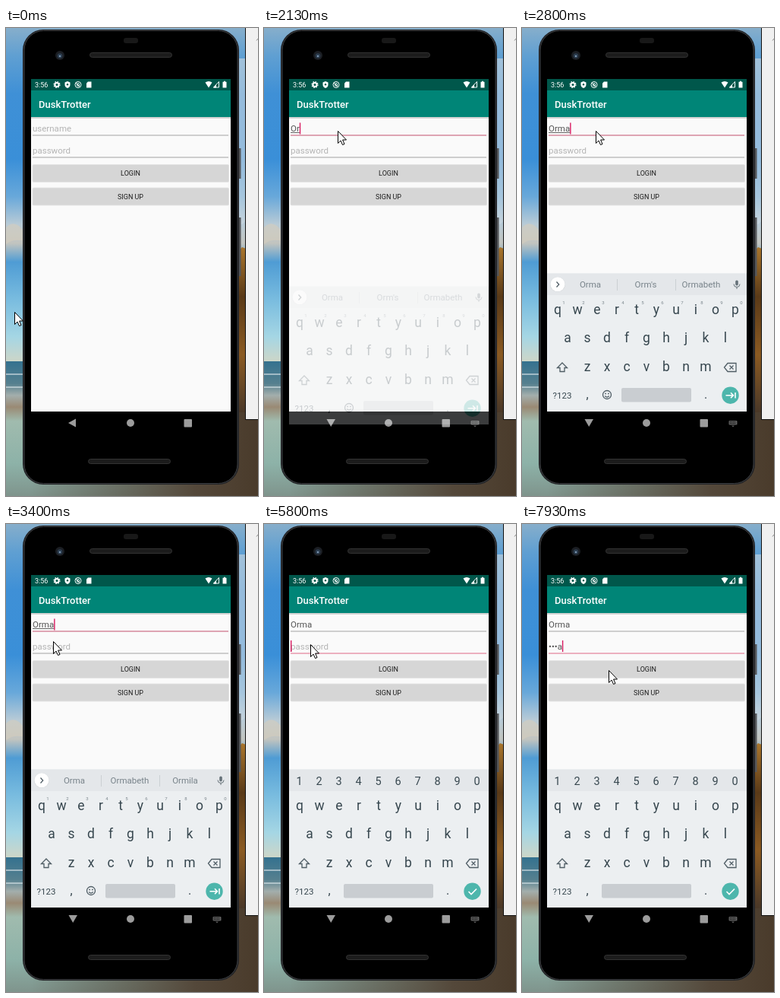
An HTML page for the animation above (8 s loop, 332 by 615 pixels).

```html
<!DOCTYPE html>
<html lang="en">
<head>
<meta charset="utf-8">
<title>Login screen demo</title>
<style>
html, body { margin: 0; width: 100%; height: 100%; overflow: hidden; background: #000; }
svg { display: block; width: 332px; height: 615px; font-family: Roboto, sans-serif; }
.field { font-size: 11.5px; fill: #555; }
.hint { fill: #b4b4b4; }
.mid { text-anchor: middle; }
.button { font-size: 9px; fill: #1c1c1c; }
.keys { fill: #37474f; }
.line { fill: none; stroke: #4f5d65; stroke-width: 1.3; }
.tip { font-size: 11.5px; fill: #78838a; }
</style>
</head>
<body>
<svg viewBox="0 0 332 615">
  <defs>
    <linearGradient id="scene" x2="0" y2="1">
      <stop offset="0" stop-color="#86aecb"/>
      <stop offset=".06" stop-color="#5f9fd2"/>
      <stop offset=".14" stop-color="#3f90d6"/>
      <stop offset=".28" stop-color="#3a8fd8"/>
      <stop offset=".36" stop-color="#68a8da"/>
      <stop offset=".42" stop-color="#b9cbd6"/>
      <stop offset=".46" stop-color="#c2c4bf"/>
      <stop offset=".5" stop-color="#4f9cd4"/>
      <stop offset=".58" stop-color="#79bcdf"/>
      <stop offset=".66" stop-color="#a5d6e4"/>
      <stop offset=".712" stop-color="#cdd6c8"/>
      <stop offset=".712" stop-color="#34718f"/>
      <stop offset=".76" stop-color="#56808f"/>
      <stop offset=".785" stop-color="#a3aeac"/>
      <stop offset=".81" stop-color="#9a8a74"/>
      <stop offset=".84" stop-color="#a0bbae"/>
      <stop offset=".93" stop-color="#8db2a8"/>
      <stop offset="1" stop-color="#7f948c"/>
    </linearGradient>
    <linearGradient id="rock" x2="0" y2="1">
      <stop offset="0" stop-color="#a9752c"/>
      <stop offset=".3" stop-color="#5a3a18"/>
      <stop offset=".65" stop-color="#8a5a22"/>
      <stop offset="1" stop-color="#4a3828"/>
    </linearGradient>
    <linearGradient id="beach">
      <stop offset=".1" stop-color="#54483a" stop-opacity="0"/>
      <stop offset=".75" stop-color="#54483a"/>
      <stop offset="1" stop-color="#4a3b2b"/>
    </linearGradient>
    <clipPath id="clip"><rect x="33" y="67" width="263" height="468"/></clipPath>
  </defs>

  <!-- backdrop -->
  <rect width="332" height="615" fill="url(#scene)"/>
  <path d="M0 262Q12 250 24 268V280Q10 276 0 284Z" fill="#d5cdbd" opacity=".6"/>
  <path d="M300 40H318V250Q306 270 300 240Z" fill="#cfd9df" opacity=".6"/>
  <path d="M0 455H24M0 472H24" stroke="#dbe6ea" stroke-width="2" opacity=".6"/>
  <rect y="500" width="332" height="115" fill="url(#beach)"/>
  <path d="M300 300L311 288L332 296V505H300Z" fill="url(#rock)"/>
  <rect x="315.500" y="-1" width="20" height="515.500" fill="#f0f0f0" stroke="#111"/>
  <path d="M332 14L330 16.500" stroke="#888"/>

  <!-- phone -->
  <path d="M308 158V198M308 249V326" stroke="#55575a" stroke-width="3"/>
  <rect x="22" y="2" width="285" height="598" rx="27" fill="#222326"/>
  <rect x="24" y="3.500" width="281" height="595" rx="25.500" fill="#000" stroke="#3d3f42"/>
  <rect x="155" y="13" width="19" height="7" rx="3" fill="#181818"/>
  <g fill="#1c1c1c" stroke="#333">
    <rect x="110.500" y="32.500" width="108" height="6" rx="3"/>
    <rect x="108.500" y="566.500" width="108" height="6" rx="3"/>
  </g>
  <circle cx="71" cy="36" r="6" fill="#1b1e23"/>
  <circle cx="71" cy="36.500" r="3.300" fill="#2b3c4e"/>
  <circle cx="71" cy="37" r="1.200" fill="#7f9ab5"/>

  <!-- app -->
  <rect x="33" y="67" width="263" height="437" fill="#fafafa"/>
  <rect x="33" y="117" width="263" height="2" fill="#d4d4d4"/>
  <rect x="33" y="82" width="263" height="35" fill="#008577"/>
  <rect x="33" y="67" width="263" height="15" fill="#00574b"/>
  <g fill="#fff">
    <text x="38" y="78" font-size="9">3:56</text>
    <circle cx="67" cy="74.500" r="2.600" fill="none" stroke="#fff" stroke-width="2"/>
    <circle cx="67" cy="74.500" r="4" fill="none" stroke="#fff" stroke-width="1.200" stroke-dasharray="1.6 1.540"/>
    <path d="M81 70L84.500 71.500V74.500Q84.500 77.500 81 79Q77.500 77.500 77.500 74.500V71.500Z"/>
    <circle cx="81" cy="74.300" r="1.200" fill="#00574b"/>
    <g fill="none" stroke="#fff">
      <circle cx="95" cy="74.500" r="4"/><circle cx="95" cy="74.500" r="1.700"/><path d="M92 72L97 77"/>
    </g>
    <path d="M108 70.500H112.500V78.500H106V72.500Z"/>
    <path d="M262.500 71.500Q267 68.500 271.500 71.500L267 78.500Z"/>
    <path d="M280.500 70.500V78H273.500Z" fill="none" stroke="#fff"/><path d="M277 74.500V78.500H273Z"/>
    <path d="M287 69.700H289V70.700H290.500V78.500H285.500V70.700H287Z"/>
    <text x="43" y="104.700" font-size="13" font-weight="500">DuskTrotter</text>
  </g>
  <rect id="userLine" x="35" y="140.500" width="258" height="1"/>
  <rect id="passLine" x="35" y="169.500" width="258" height="1"/>
  <text id="user" class="field" x="35" y="136"></text>
  <text id="pass" class="field" x="35" y="165"></text>
  <rect id="spell" x="35" y="137" height="1" fill="#666"/>
  <rect id="caret" width="1.400" height="15" fill="#d81b60"/>
  <g fill="#d6d6d6" stroke="#e4e4e4" stroke-width=".8">
    <rect x="35" y="179.500" width="258.500" height="23" rx="1.500"/>
    <rect x="35" y="210" width="258.500" height="23" rx="1.500"/>
  </g>
  <text class="mid button" x="164" y="194">LOGIN</text>
  <text class="mid button" x="164" y="225">SIGN UP</text>

  <!-- navigation -->
  <g fill="#9c9c9c">
    <path id="back"/>
    <circle cx="164" cy="519" r="5"/>
    <rect x="234.500" y="514" width="10.500" height="10.500" rx="1"/>
    <g id="imeIcon" fill="#5c5c5c">
      <rect x="272.500" y="516" width="11" height="5.500" rx="1"/>
      <path d="M274 517.500H282M274 519.500H282" stroke="#000" stroke-dasharray="1 1"/>
      <path d="M276 522.500H280L278 524.500Z"/>
    </g>
  </g>

  <!-- keyboard -->
  <g clip-path="url(#clip)"><g id="keyboard" class="keys">
    <rect x="33" y="322.500" width="263" height="181.500" fill="#eceff1"/>
    <rect x="33" y="322.500" width="263" height="28.500" fill="#e4e7ea"/>
    <g id="letters" class="mid" font-size="17.500"></g>
    <g class="line">
      <path d="M53 440L59.500 446.500H56V451.500H50V446.500H46.500Z"/>
      <path d="M266.500 446L271 440.500H282V451.500H271ZM273.500 443.500L278.500 448.500M278.500 443.500L273.500 448.500"/>
    </g>
    <text class="mid" x="53" y="486.500" font-size="11.500">?123</text>
    <text class="mid" x="86" y="487" font-size="16">,</text>
    <text class="mid" x="242" y="487" font-size="16">.</text>
    <rect id="space" y="473" height="18.500" rx="2" fill="#c9cdd1"/>
    <circle cx="274.500" cy="482.700" r="11.200" fill="#4db6ac"/>
    <path id="enter" fill="none" stroke="#fff" stroke-width="1.600"/>
    <g id="textMode">
      <circle cx="47" cy="337" r="10" fill="#d5d9dc"/>
      <circle cx="47" cy="336.700" r="9.500" fill="#fff"/>
      <path class="line" d="M45.500 333.500L48.700 337L45.500 340.500"/>
      <path d="M125.500 330V345M202.500 330V345" stroke="#cbd0d3"/>
      <text class="mid tip" x="90" y="341"></text>
      <text class="mid tip" x="163" y="341"></text>
      <text class="mid tip" x="236" y="341"></text>
      <rect x="281.200" y="331.500" width="3.600" height="7" rx="1.800" fill="#667279"/>
      <path d="M279 336.500Q279 340.500 283 340.500T287 336.500M283 340.500V343" fill="none" stroke="#667279"/>
      <g id="corners" class="mid" font-size="6" fill="#7c878d"></g>
      <circle class="line" cx="112" cy="482" r="5.500"/>
      <path class="line" d="M109.300 483.500Q112 486.700 114.700 483.500"/>
      <path d="M109.300 480.500H111M113 480.500H114.700" stroke="#4f5d65" stroke-width="1.400"/>
    </g>
    <g id="digits" class="mid" font-size="14.500"></g>
  </g></g>

  <path id="mouse" d="M.500 .500V16.500L4 13L6.500 18.500L9 17.500L6.600 12H11.500Z" fill="#fff" stroke="#000"/>
</svg>
<script>
const $ = id => document.getElementById(id);
const LOOP = 8000, TICK = 1000 / 15;

function addText(group, text, x, y) {
  const node = document.createElementNS('http://www.w3.org/2000/svg', 'text');
  node.setAttribute('x', x);
  node.setAttribute('y', y);
  node.textContent = text;
  $(group).append(node);
}
function addRow(group, chars, x, y) {
  [...chars].forEach((c, i) => addText(group, c, x + i * 26, y));
}
addRow('letters', 'qwertyuiop', 47, 376);
addRow('letters', 'asdfghjkl', 60, 413);
addRow('letters', 'zxcvbnm', 86, 451);
addRow('corners', '1234567890', 55, 363);
addRow('digits', '1234567890', 46.5, 343);

// Tables start with the tick (1/15 s) from which a row holds.
const mousePath = [
  [0, 11, 373], [1, 11, 373], [2, 7, 387], [3, 12, 370], [4, 42, 300], [5, 88, 215],
  [6, 124, 146], [7, 134, 120], [8, 126, 126], [10, 106, 141], [13, 106, 141],
  [16, 97, 135], [42, 97, 135], [51, 62, 154], [55, 62, 154], [58, 58, 154],
  [76, 58, 154], [81, 61, 158], [109, 61, 158], [119, 114, 192]
];
const userSteps = [[0, ''], [23, 'O'], [32, 'Or'], [33, 'Orm'], [42, 'Orma']];
const passSteps = [[0, ''], [90, 'o'], [93, '•r'], [100, '••m'], [102, '•••a']];
const caretSteps = [[0, 0], [23, 1], [34, .5], [35, 1], [58, 0], [65, 1], [73, 0], [80, 1], [110, 0], [118, 1]];
const slideSteps = [[0, 18, 0], [32, 17, .25], [33, 10, .65], [34, 5, .87], [35, 2, 1], [36, 0, 1]];
const tipSteps = [[0, ['Orma', 'Orm\'s', 'Ormabeth']], [43, ['Orma', 'Ormabeth', 'Ormila']]];
const userLineSteps = [[0, '#a3a3a3'], [20, '#c4506f'], [87, '#a3a3a3']];
const passLineSteps = [[0, '#a3a3a3'], [84, '#e06a88']];

const at = (steps, n) => steps.findLast(s => s[0] <= n).slice(1);
const set = (id, attrs) => {
  for (const key in attrs) $(id).setAttribute(key, attrs[key]);
};
const show = (id, on) => set(id, { visibility: on ? 'visible' : 'hidden' });

function mouseAt(n) {
  const i = mousePath.findLastIndex(p => p[0] <= n);
  const a = mousePath[i], b = mousePath[i + 1] || a;
  const k = b === a ? 0 : (n - a[0]) / (b[0] - a[0]);
  return [1, 2].map(j => Math.round(a[j] + (b[j] - a[j]) * k));
}

function setField(id, value, hint) {
  $(id).textContent = value || hint;
  $(id).classList.toggle('hint', !value);
  return value ? $(id).getComputedTextLength() : 0;
}

function render(n) {
  const onPass = n >= 87, open = n >= 32;
  const userWidth = setField('user', at(userSteps, n)[0], 'username');
  const passWidth = setField('pass', at(passSteps, n)[0], 'password');
  set('userLine', { fill: at(userLineSteps, n)[0] });
  set('passLine', { fill: at(passLineSteps, n)[0] });
  set('spell', { width: onPass ? 0 : userWidth });
  set('caret', {
    x: 35 + (onPass ? passWidth : userWidth),
    y: onPass ? 153 : 124.5,
    opacity: at(caretSteps, n)[0]
  });

  const [dy, alpha] = at(slideSteps, n);
  set('keyboard', { transform: `translate(0 ${dy})`, opacity: alpha });
  show('textMode', !onPass);
  show('digits', onPass);
  set('space', onPass ? { x: 105, width: 118 } : { x: 131, width: 92 });
  set('enter', { d: onPass ? 'M269.500 483L273 486.500L280 479.500' : 'M268.500 482.700H278M275 479.300L278.400 482.700L275 486.100M281 479V486.500' });
  const tips = at(tipSteps, n)[0];
  document.querySelectorAll('.tip').forEach((node, i) => node.textContent = tips[i]);

  set('back', { d: open ? 'M82.500 514H94L88.200 524Z' : 'M92 513.500V524.500L82 519Z' });
  show('imeIcon', open);
  set('mouse', { transform: `translate(${mouseAt(n)})` });
}

const start = performance.now();
let shown = -1;
function frame() {
  const t = (performance.now() - start) % LOOP;
  const n = Math.min(119, Math.floor((t + 5) / TICK));
  if (n !== shown) render(shown = n);
  requestAnimationFrame(frame);
}
frame();
</script>
</body>
</html>
```
